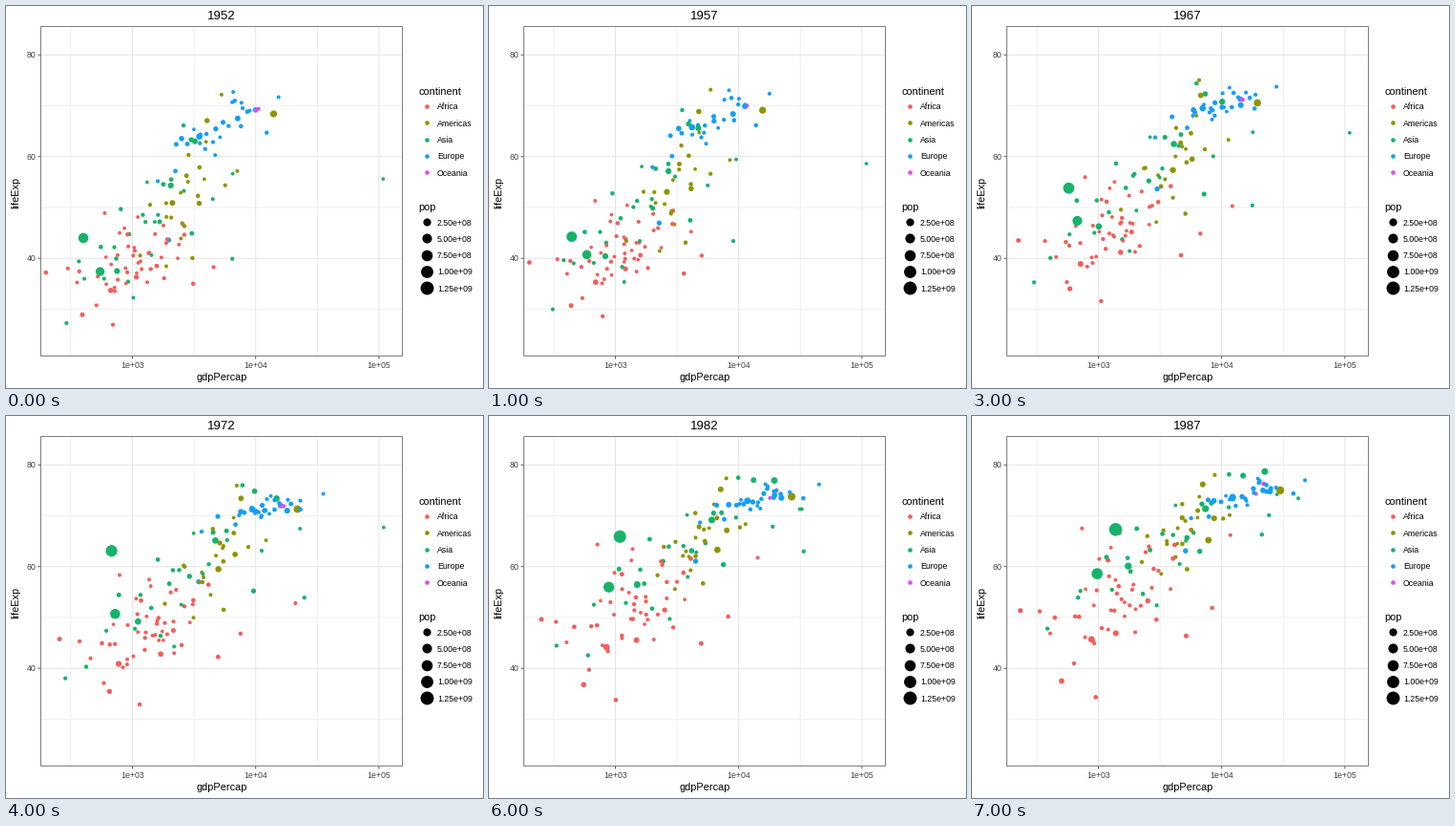
These frames come from a looping animation (500x400 px, 8 s). A matplotlib script:

```python
import matplotlib.pyplot as plt
import numpy as np
from matplotlib.animation import FuncAnimation
from matplotlib.patches import Rectangle

plt.rcParams["font.family"] = "Liberation Sans"
plt.rcParams["path.snap"] = False
PT = 0.72  # points per pixel at 100 dpi
AF, AM, AS, EU, OC = range(5)
NAMES = ["Africa", "Americas", "Asia", "Europe", "Oceania"]
COLORS = ["#f35e5a", "#909400", "#17b36a", "#149ff5", "#e04bf1"]
GROWTH = [0.025, 0.015, 0.02, 0.007, 0.016]
STEPS = 8
STEP = np.arange(STEPS)  # five years each
KEYS = (0, 4, 7)

rng = np.random.default_rng(12)
tracks = []  # continent, log income, life expectancy, population


def growing(cont, pop):
    """Population in millions over time, given its value in 1972."""
    return pop * (1 + GROWTH[cont]) ** (5 * STEP - 20)


def landmark(cont, pop, *points):
    """One country that stands out, through (step, income, life) points."""
    steps, gdp, life = zip(*points)
    x = np.interp(STEP, steps, np.log10(gdp))
    y = np.interp(STEP, steps, life)
    tracks.append((cont, x, y, growing(cont, pop)))


def crowd(cont, n, pop, rho, log_gdp, gdp_sd, life, life_sd):
    """The other countries: a correlated cloud that drifts and changes width."""
    p = (np.arange(n) + 0.5) / n
    scores = 0.55 * np.log(p / (1 - p))
    mean_x, sd_x, mean_y, sd_y = (np.interp(STEP, KEYS, v)
                                  for v in (log_gdp, gdp_sd, life, life_sd))
    cap = 74 + 4.2 * STEP / (STEPS - 1)
    rank, noise, sizes = (rng.permutation(scores) for _ in range(3))
    mix = rho * rank + np.sqrt(1 - rho ** 2) * noise
    for u, v, w in zip(rank, mix, sizes):
        phase = rng.uniform(0, 2 * np.pi)
        x = mean_x + sd_x * u + 0.04 * np.sin(phase + 0.8 * STEP)
        y = mean_y + sd_y * v + 0.4 * np.cos(phase + 0.6 * STEP)
        y = cap - 1.2 * np.log1p(np.exp((cap - y) / 1.2))  # soft ceiling
        tracks.append((cont, x, y, growing(cont, pop * np.exp(1.2 * w))))


crowd(AF, 50, 4, 0.45, (2.99, 3.13, 3.14), (0.28, 0.28, 0.32), (39, 47.3, 53.2), (5, 6, 7.6))
crowd(AM, 22, 5, 0.6, (3.46, 3.67, 3.71), (0.2, 0.19, 0.19), (52.5, 61.8, 67.8), (8.5, 6.8, 5.3))
crowd(AS, 25, 9, 0.7, (3.13, 3.42, 3.62), (0.32, 0.44, 0.48), (47, 58.5, 65.5), (8.5, 8.5, 7.5))
crowd(EU, 27, 9, 0.8, (3.69, 4.06, 4.2), (0.24, 0.21, 0.22), (65.3, 71.3, 74.2), (4.6, 1.9, 2.3))

landmark(AF, 54, (0, 1077, 36.3), (4, 1698, 42.8), (7, 1385, 46.9))
landmark(AF, 2.2, (0, 2388, 42.7), (4, 21011, 52.8), (7, 11771, 66.2))
landmark(AM, 56, (0, 3478, 50.8), (4, 6809, 62.4), (7, 8688, 69.5))
landmark(AM, 101, (0, 2109, 50.9), (4, 4986, 59.5), (7, 7807, 65.2))
landmark(AM, 210, (0, 13990, 68.4), (4, 21806, 71.3), (7, 29884, 75))
landmark(AS, 31, (0, 3035, 44.9), (4, 9614, 55.2), (7, 6643, 63))
landmark(AS, 0.8, (0, 108382, 55.6), (4, 109348, 67.7), (6, 31354, 71.3), (7, 28118, 74.2))
landmark(AS, 6.5, (0, 6460, 39.9), (4, 24837, 53.9), (6, 33693, 63), (7, 21198, 66.3))
landmark(AS, 7.5, (0, 368, 39.4), (4, 422, 40.3), (5, 525, 31.2), (7, 684, 53.9))
landmark(AS, 121, (0, 750, 37.5), (4, 1111, 49.2), (7, 1748, 60.1))
landmark(AS, 107, (0, 3217, 63), (4, 14779, 73.4), (7, 22376, 78.7))
landmark(AS, 567, (0, 547, 37.4), (4, 724, 50.7), (7, 977, 58.6))
landmark(AS, 862, (0, 400, 44), (2, 488, 44.5), (4, 677, 63.1), (7, 1379, 67.3))
landmark(EU, 38, (0, 1969, 43.6), (4, 3451, 57), (7, 5089, 63.1))
landmark(EU, 56, (0, 9980, 69.2), (4, 15895, 72), (7, 21665, 75))
landmark(EU, 79, (0, 7144, 67.5), (4, 18016, 71), (7, 24639, 74.8))
landmark(OC, 13, (0, 10040, 69.1), (4, 16789, 71.9), (7, 21889, 76.3))
landmark(OC, 2.9, (0, 10557, 69.4), (4, 16046, 71.9), (7, 19007, 74.3))


def px(log_gdp):
    return 132.5 + 129.2 * (log_gdp - 3)


def py(life):
    return 51.2 + 5.325 * (80 - life)


def area(pop):
    """Marker area in square points for a population in millions."""
    size = 1 + 5 * np.sqrt(pop / 1318.7)
    width = 0.75 * (2.845 * size + 0.945) + 0.7
    return (width * PT) ** 2


fig = plt.figure(figsize=(5, 4), dpi=100, facecolor="white")
ax = fig.add_axes([0, 0, 1, 1])
ax.set_xlim(0, 500)
ax.set_ylim(400, 0)
ax.axis("off")

LEFT, TOP, RIGHT, BOTTOM = 36.5, 21.5, 415.5, 366.5


def line(xs, ys, color, z=0):
    ax.plot(xs, ys, color=color, lw=PT, zorder=z, solid_capstyle="butt", snap=False)


def text(x, y, s, size, color="black", ha="left", rot=0):
    return ax.text(x, y, s, fontsize=size * PT, color=color, ha=ha, va="baseline",
                   rotation=rot, rotation_mode="anchor")


for v in (2.5, 3.5, 4.5):
    line([px(v)] * 2, [TOP, BOTTOM], "#f0f0f0")
for v in (30, 50, 70):
    line([LEFT, RIGHT], [py(v)] * 2, "#f0f0f0")
for v in (3, 4, 5):
    line([px(v)] * 2, [TOP, BOTTOM], "#e4e4e4", 1)
    line([px(v)] * 2, [BOTTOM, BOTTOM + 3], "#555555", 1)
    text(px(v), 378.6, f"1e+0{v}", 8.8, "#404040", "center")
for v in (40, 60, 80):
    line([LEFT, RIGHT], [py(v)] * 2, "#e4e4e4", 1)
    line([LEFT - 3, LEFT], [py(v)] * 2, "#555555", 1)
    text(31.2, py(v) + 3.2, str(v), 8.8, "#404040", "right")
ax.add_patch(Rectangle((LEFT, TOP), RIGHT - LEFT, BOTTOM - TOP, fill=False,
                       ec="#7f7f7f", lw=PT, zorder=4, snap=False))

title = text(226, 14.5, "", 13.2, ha="center")
text(226, 391.5, "gdpPercap", 11, ha="center")
text(13, 195, "lifeExp", 11, ha="center", rot=90)


def key(x, y, s, label, color):
    ax.scatter(x, y, s=s, c=color, linewidths=0)
    text(x + 11, y + 3.3, label, 8.8)


text(432.4, 93, "continent", 11)
for i, (name, color) in enumerate(zip(NAMES, COLORS)):
    key(441, 105.2 + 17.28 * i, (4.6 * PT) ** 2, name, color)
text(432.4, 214.3, "pop", 11)
for i in range(5):
    pop = 250 * (i + 1)
    key(441, 226.2 + 17.28 * i, area(pop), f"{pop * 1e6:.2e}", "black")

rng.shuffle(tracks)
conts, xs, ys, pops = (np.array(part) for part in zip(*tracks))
xs, ys, areas = px(xs), py(ys), area(pops)
dots = ax.scatter(xs[:, 0], ys[:, 0], s=areas[:, 0], linewidths=0, zorder=3,
                  c=[COLORS[c] for c in conts])


def update(step):
    dots.set_offsets(np.column_stack([xs[:, step], ys[:, step]]))
    dots.set_sizes(areas[:, step])
    title.set_text(str(1952 + 5 * step))
    return dots, title


anim = FuncAnimation(fig, update, frames=STEPS, interval=1000, repeat=True,
                     repeat_delay=0, blit=False)
plt.show()
```
